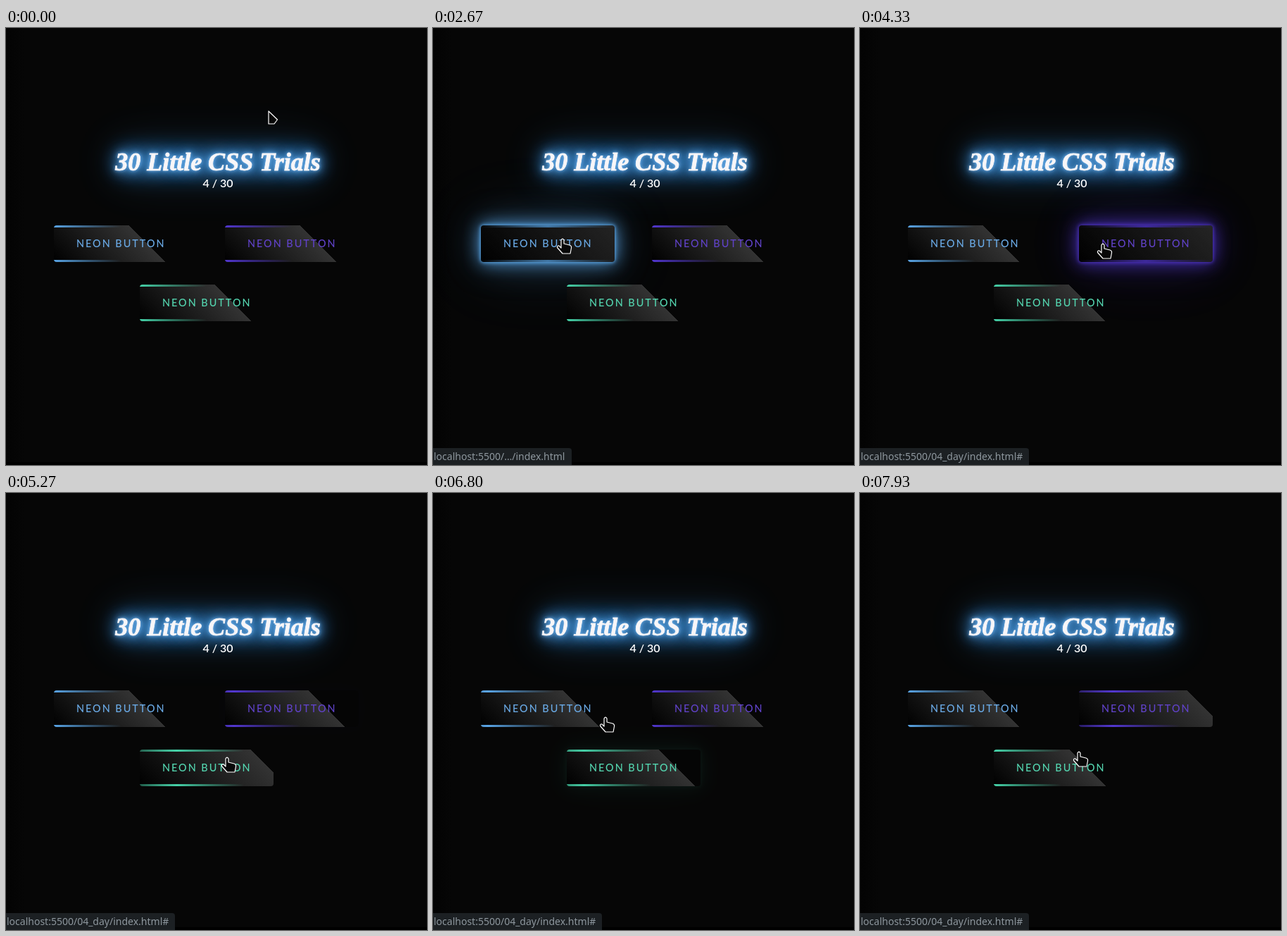
Animation, 598 px wide and 620 px high, one loop 8 s. Source, as an HTML page:

```html
<!DOCTYPE html>
<html lang="en">
<head>
<meta charset="utf-8">
<title>Neon buttons</title>
<style>
  html, body { margin: 0; width: 100%; height: 100%; overflow: hidden; background: #060606; }
  body { position: relative; font-family: Lato, sans-serif; white-space: nowrap; }
  body > * { position: absolute; }
  .edge { left: 0; top: 0; width: 26px; height: 620px; background: linear-gradient(90deg, #030303, #060606); }
  .floor { left: 0; top: 616px; width: 598px; height: 4px; background: #000; }
  .halo {
    left: 155px; top: 172px; width: 292px; height: 36px; border-radius: 18px;
    background: #2f7cc0; filter: blur(15px); opacity: .8; box-shadow: 0 0 60px #2f7cc060;
  }
  h1, p { left: 0; width: 602px; margin: 0; text-align: center; color: #fff; }
  h1 {
    top: 170px; font: italic bold 36px/40px "Liberation Serif", serif; color: #f8f6f8;
    -webkit-text-stroke: .8px #f8f6f8;
    text-shadow: 0 0 4px #78b8f0, 0 0 9px #5aa5e6, 0 0 16px #5aa5e6, 0 0 26px #4a98e0;
  }
  p { top: 210px; font-size: 16px; line-height: 20px; font-weight: 600; }
  .button {
    width: 190px; height: 52px; border-radius: 4px; color: var(--text);
    font-size: 14.4px; font-weight: 500; line-height: 52px; letter-spacing: 2px;
    --line: linear-gradient(90deg, transparent calc(var(--peak) - 95px), var(--neon) var(--peak), transparent calc(var(--peak) + 95px));
    background:
      linear-gradient(rgba(0, 0, 0, var(--shade)) 0 0),
      var(--line) top / 100% 3px no-repeat,
      var(--line) bottom / 100% 3px no-repeat,
      linear-gradient(45deg, #000, #333 var(--cut), transparent var(--cut));
  }
  .button span { position: absolute; left: 32px; }
  .glow {
    position: absolute; inset: 0; border-radius: 4px; opacity: var(--glow);
    box-shadow: 0 0 5px 1px var(--neon), 0 0 25px var(--neon),
      0 0 50px color-mix(in srgb, var(--neon) 35%, transparent),
      0 0 100px color-mix(in srgb, var(--neon) 20%, transparent);
  }
  #status {
    left: 0; top: 596px; height: 24px; padding-left: 1px; box-sizing: border-box; overflow: hidden;
    border-radius: 0 4px 0 0; background: #1c2023; color: #8e979e;
    font: 14px/24px "Noto Sans", sans-serif;
  }
  svg { left: 0; top: 0; overflow: visible; fill: #080808; stroke: #fff; stroke-width: 1.2; stroke-linejoin: round; }
</style>
</head>
<body>
<div class="edge"></div>
<div class="floor"></div>
<div class="halo"></div>
<h1>30 Little CSS Trials</h1>
<p>4 / 30</p>
<div id="status"></div>
<svg id="cursor" width="1" height="1"><path id="shape"/></svg>
<script>
const LOOP = 8000, SWEEP = 600, GLOW_DELAY = 800, GLOW = 400;
const WIDTH = 190, HEIGHT = 52;
const ARROW = 'M0 0V18H8L12.5 12Z';
const HAND = 'M-2 2Q0-1.8 2 2V7L10 9Q13 10 12.5 13L11 21H0L-7.5 12.5Q-8 9.5-5 10L-2 13Z';

const buttons = [
  { x: 68, y: 280, neon: '#5aa5e6', text: '#6aaae6' },
  { x: 311, y: 280, neon: '#5237d0', text: '#6042c8' },
  { x: 190, y: 364, neon: '#46d2a8', text: '#54d6b0' }
];

// Pointer moves: start time, end time, x, y. It rests in between.
const moves = [
  [470, 1150, 210, 180],
  [1150, 1540, 184, 299],
  [3130, 3300, 345, 306],
  [4800, 5130, 314, 375],
  [6470, 6800, 245, 318],
  [6800, 7290, 256, 313],
  [7290, 7330, 274, 312],
  [7330, 7480, 330, 315],
  [7480, 7750, 330, 325],
  [7750, 7930, 311, 367]
];

const clamp = v => Math.max(0, Math.min(1, v));
const mix = (a, b, k) => a + (b - a) * k;

// The CSS "ease" curve, cubic-bezier(.25, .1, .25, 1).
function ease(v) {
  const x = clamp(v);
  let s = x;
  for (let i = 0; i < 8; i++) s -= (.75 * s - .75 * s * s + s ** 3 - x) / (.75 - 1.5 * s + 3 * s * s);
  return .3 * s * (1 - s) ** 2 + 3 * s * s * (1 - s) + s ** 3;
}

function pointerAt(t) {
  let x = 373, y = 118;
  for (const [start, end, toX, toY] of moves) {
    const k = clamp((t - start) / (end - start));
    x = mix(x, toX, k);
    y = mix(y, toY, k);
  }
  return [x, y];
}

function isOver(button, [x, y]) {
  return x >= button.x && x < button.x + WIDTH && y >= button.y && y < button.y + HEIGHT;
}

// Follows the pointer through one loop and lists each hover as [enter, leave].
function findHovers(button) {
  const hovers = [];
  let inside = false;
  for (let t = 0; t <= LOOP; t += 2) {
    const over = isOver(button, pointerAt(t));
    if (over && !inside) hovers.push([t, LOOP]);
    if (!over && inside) hovers.at(-1)[1] = t;
    inside = over;
  }
  return hovers;
}

function progress(hovers, t, delay, duration) {
  return Math.max(...hovers.map(([enter, leave]) => {
    const rise = ease((Math.min(t, leave) - enter - delay) / duration);
    return rise * (1 - ease((t - leave) / duration));
  }));
}

const status = document.getElementById('status');
const cursor = document.getElementById('cursor');
const shape = document.getElementById('shape');

for (const button of buttons) {
  const el = button.el = document.createElement('div');
  el.className = 'button';
  el.innerHTML = '<div class="glow"></div><span>NEON BUTTON</span>';
  el.style.left = button.x + 'px';
  el.style.top = button.y + 'px';
  el.style.setProperty('--neon', button.neon);
  el.style.setProperty('--text', button.text);
  document.body.insertBefore(el, status);
  button.hovers = findHovers(button);
}

function draw() {
  const t = performance.now() % LOOP;

  for (const { el, hovers } of buttons) {
    const sweep = progress(hovers, t, 0, SWEEP);
    const glow = progress(hovers, t, GLOW_DELAY, GLOW);
    el.style.setProperty('--cut', mix(65.7, 103, sweep) + '%');
    el.style.setProperty('--peak', WIDTH / 2 * sweep + 'px');
    el.style.setProperty('--glow', glow);
    el.style.setProperty('--shade', .28 * glow);
  }

  status.style.opacity = clamp((t - 1600) / 250);
  status.style.width = mix(197, 240, clamp((t - 3130) / 130)) + 'px';
  status.textContent = t < 3130 ? 'localhost:5500/…/index.html' : 'localhost:5500/04_day/index.html#';

  const pointer = pointerAt(t);
  cursor.style.transform = `translate(${pointer[0]}px, ${pointer[1]}px)`;
  shape.setAttribute('d', buttons.some(b => isOver(b, pointer)) ? HAND : ARROW);
  requestAnimationFrame(draw);
}
draw();
</script>
</body>
</html>
```
